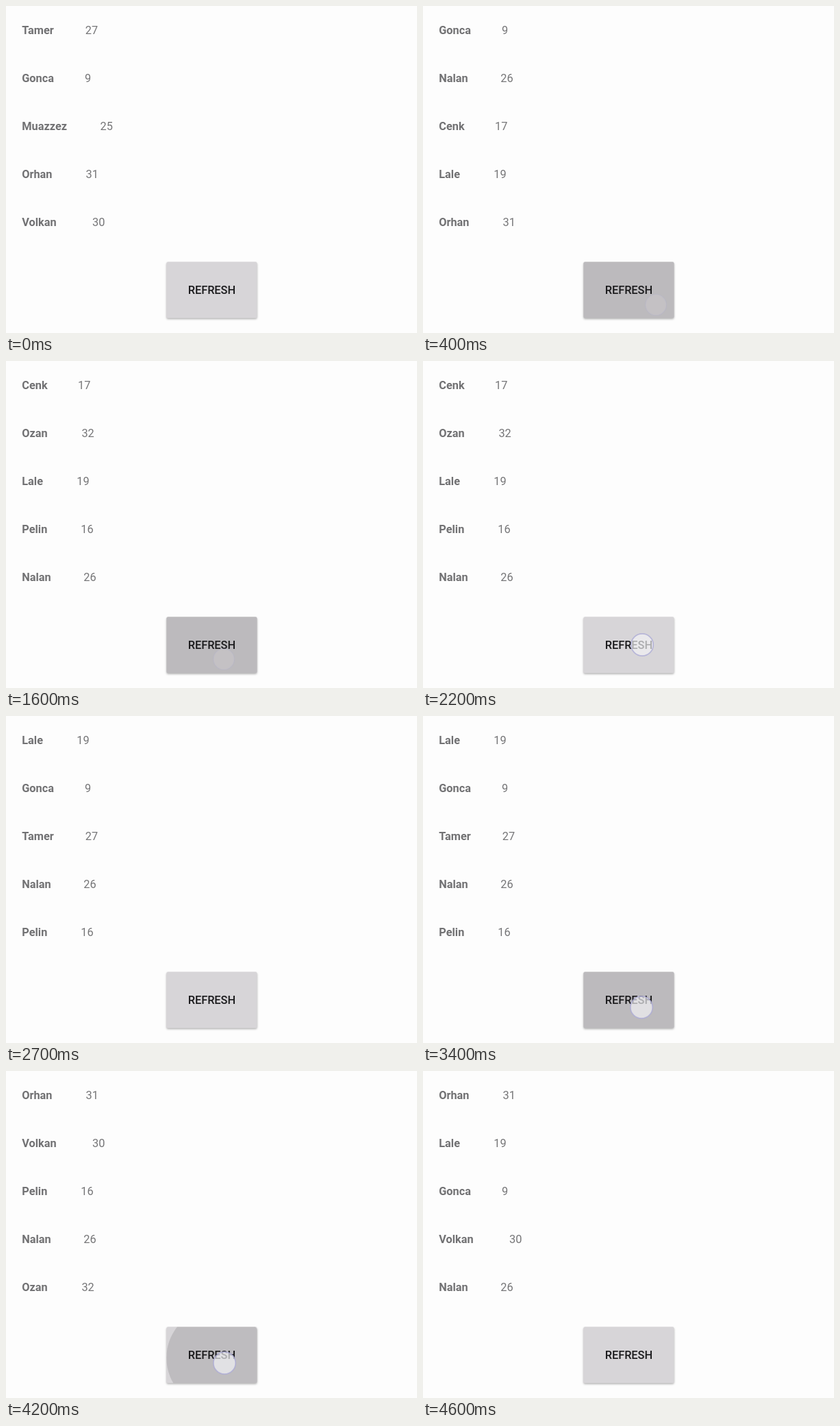
Recreate the animation shown at these times as an HTML page with a canvas. Size 600x477 px, loop 5.2 s.

```html
<!DOCTYPE html>
<html lang="tr">
<head>
<meta charset="utf-8">
<title>Refresh list</title>
<style>
html, body { margin: 0; width: 100%; height: 100%; overflow: hidden; background: #fdfdfd; }
canvas { display: block; width: 600px; height: 477px; }
</style>
</head>
<body>
<canvas id="stage" width="600" height="477"></canvas>
<script>
const ctx = document.getElementById('stage').getContext('2d');
const LOOP = 5200, STEP = 100;
const FONT = '16.35px Roboto, sans-serif';
const BUTTON = { x: 234.3, y: 373.2, w: 132.2, h: 82, r: 2.3 };
const CENTER = { x: 300.4, y: 414.2 };

// name: [age, x of age]
const PEOPLE = {
  Tamer: [27, 115.7], Gonca: [9, 115], Muazzez: [25, 137.5], Orhan: [31, 116.6],
  Volkan: [30, 126.1], Nalan: [26, 113.2], Cenk: [17, 105], Lale: [19, 103.2],
  Ozan: [32, 110.4], Pelin: [16, 109.2]
};

const FIRST_LIST = 'Tamer Gonca Muazzez Orhan Volkan';

// The finger lands at touch, the ripple starts at down, the list changes at swap
const PRESSES = [
  { touch: 100, down: 100, swap: 400, x: 340, y: 436, list: 'Gonca Nalan Cenk Lale Orhan' },
  { touch: 1300, down: 1300, swap: 1600, x: 318, y: 435, list: 'Cenk Ozan Lale Pelin Nalan' },
  { touch: 2200, down: 2400, swap: 2500, x: 320, y: 414, list: 'Lale Gonca Tamer Nalan Pelin' },
  { touch: 3200, down: 3200, swap: 3600, x: 319, y: 425, list: 'Orhan Volkan Pelin Nalan Ozan' },
  { touch: 4100, down: 4100, swap: 4400, x: 319, y: 426, list: 'Orhan Lale Gonca Volkan Nalan' }
];

// Spans in which the screen stalls
const STALLS = [[400, 600], [3700, 4100]];

const clamp = v => Math.min(1, Math.max(0, v));
const mix = (a, b, t) => a + (b - a) * t;
const easeOut = t => 1 - (1 - t) ** 2;

function text(value, x, y, weight, color, align = 'left') {
  ctx.font = `${weight} ${FONT}`;
  ctx.fillStyle = color;
  ctx.textAlign = align;
  ctx.fillText(value, x, y);
}

function disc(x, y, r, color) {
  ctx.beginPath();
  ctx.arc(x, y, r, 0, Math.PI * 2);
  ctx.fillStyle = color;
  ctx.fill();
}

function buttonPath() {
  const { x, y, w, h, r } = BUTTON;
  ctx.beginPath();
  ctx.roundRect(x, y, w, h, r);
}

function drawList(names) {
  names.split(' ').forEach((name, i) => {
    const [age, x] = PEOPLE[name];
    const y = 41 + i * 70;
    text(name, 23.2, y, 700, '#717173');
    text(age, x, y, 400, '#757577');
  });
}

function drawButton() {
  ctx.save();
  ctx.shadowColor = 'rgba(0,0,0,.3)';
  ctx.shadowBlur = 3;
  ctx.shadowOffsetY = 1.5;
  buttonPath();
  ctx.fillStyle = '#d7d5d8';
  ctx.fill();
  ctx.restore();
}

function drawRipple({ down, swap, x, y }, time) {
  if (time < down) return;
  const spread = easeOut(clamp((time - down + 40) / 220));
  const fade = clamp((swap + 140 - time) / 140);
  const drift = spread * 0.75;
  // Once fully spread, the ripple covers the corners too
  const radius = spread < 1 ? mix(38, 78, spread) : 120;
  ctx.save();
  buttonPath();
  ctx.clip();
  disc(mix(x, CENTER.x, drift), mix(y, CENTER.y, drift), radius,
    `rgba(0,0,0,${mix(0.06, 0.126, spread) * fade})`);
  ctx.restore();
}

function drawTouch({ swap, x, y }, time) {
  const opacity = clamp((swap + 50 - time) / 250);
  if (!opacity) return;
  ctx.save();
  ctx.globalAlpha = opacity;
  disc(x, y, 15 + opacity * 1.2, 'rgba(244,243,247,.67)');
  ctx.strokeStyle = 'rgba(170,168,212,.75)';
  ctx.lineWidth = 1.7;
  ctx.stroke();
  ctx.restore();
}

function draw(now) {
  const step = Math.floor((now % LOOP) / STEP) * STEP;
  const stall = STALLS.find(([from, to]) => step >= from && step < to);
  const time = stall ? stall[0] : step;
  const press = PRESSES.findLast(p => p.touch <= time);
  const swapped = PRESSES.findLast(p => p.swap <= time);

  ctx.fillStyle = '#fdfdfd';
  ctx.fillRect(0, 0, 600, 477);
  drawList(swapped ? swapped.list : FIRST_LIST);
  drawButton();
  if (press) drawRipple(press, time);
  text('REFRESH', CENTER.x, 420, 500, '#1a1a1c', 'center');
  if (press) drawTouch(press, time);
}

const start = performance.now();
function tick() {
  draw(performance.now() - start);
  requestAnimationFrame(tick);
}
tick();
</script>
</body>
</html>
```
